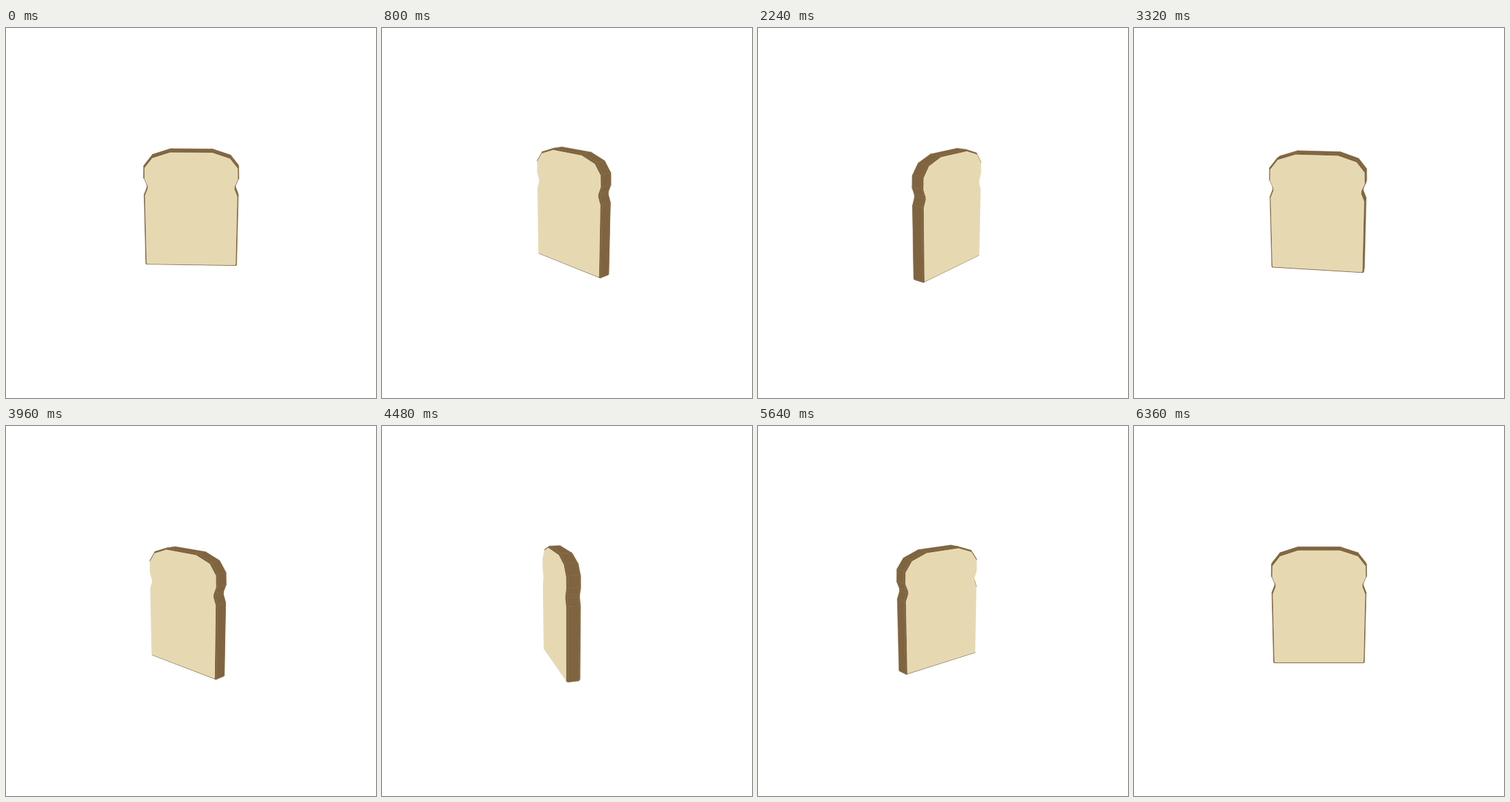
An HTML page with a canvas that plays this animation: 540 px wide and 540 px high, repeating every 6.4 s.

```html
<!DOCTYPE html>
<html lang="en">
<head>
<meta charset="utf-8">
<title>Turning slice of bread</title>
<style>
  html, body { margin: 0; width: 100%; height: 100%; overflow: hidden; background: #fff; }
  canvas { display: block; width: 540px; height: 540px; }
</style>
</head>
<body>
<canvas id="stage" width="540" height="540"></canvas>
<script>
const ctx = document.getElementById('stage').getContext('2d');
const LOOP = 6400, STEP = 40;
const CRUST = '#7f643f', CRUMB = '#e6d9b2';

// camera: distance to the turning axis and downward pitch
const DIST = 804, SIN = 0.281, COS = Math.sqrt(1 - SIN * SIN);

// right half of the slice, top to bottom, then mirrored
const half = [[30.4, 91.4], [56.5, 82.9], [68, 68.6], [68.6, 52],
              [64.2, 41.5], [63.9, 37.6], [68.4, 26.5], [68.4, -80.8], [67.4, -82]];
const outline = half.concat(half.map(([x, y]) => [-x, y]).reverse());

// cross-sections from front to back: [depth, scale]; the ends are chamfered
const rings = [[0, 0.977], [-2, 1], [-18, 1], [-20, 0.977]];
const MID_Y = -13;

function project(x, y, z, angle) {
  const c = Math.cos(angle), s = Math.sin(angle);
  const wx = x * c - z * s, wz = x * s + z * c;
  const k = DIST / (DIST - y * SIN - wz * COS);
  return [270 + wx * k, 270 - (y * COS - wz * SIN) * k];
}

function trace(points) {
  ctx.beginPath();
  points.forEach(([x, y]) => ctx.lineTo(x, y));
  ctx.closePath();
}

function area(points) {
  return points.reduce((sum, [x, y], i) => {
    const [nx, ny] = points[(i + 1) % points.length];
    return sum + x * ny - nx * y;
  }, 0);
}

function drawCrust(quad) {
  if (area(quad) >= 0) return;
  trace(quad);
  ctx.fill();
  ctx.stroke(); // closes the seams between quads
}

function drawCrumb(points) {
  trace(points);
  ctx.fill();
}

function draw(angle) {
  ctx.clearRect(0, 0, 540, 540);
  const loops = rings.map(([z, k]) =>
    outline.map(([x, y]) => project(x * k, MID_Y + (y - MID_Y) * k, z, angle)));

  ctx.fillStyle = ctx.strokeStyle = CRUST;
  ctx.lineWidth = 0.5;
  ctx.lineJoin = 'round';
  for (let r = 0; r < loops.length - 1; r++) {
    const a = loops[r], b = loops[r + 1];
    a.forEach((p, i) => {
      const j = (i + 1) % a.length;
      drawCrust([p, a[j], b[j], b[i]]);
    });
  }

  const front = loops[0], back = loops[loops.length - 1];
  ctx.fillStyle = CRUMB;
  if (area(front) > 0) drawCrumb(front);
  if (area(back) < 0) drawCrumb(back);
}

const start = performance.now();
function frame() {
  const t = (performance.now() - start) % LOOP;
  const step = Math.floor(t / STEP) + 1;
  draw(step * STEP / LOOP * 2 * Math.PI);
  requestAnimationFrame(frame);
}
frame();
</script>
</body>
</html>
```
